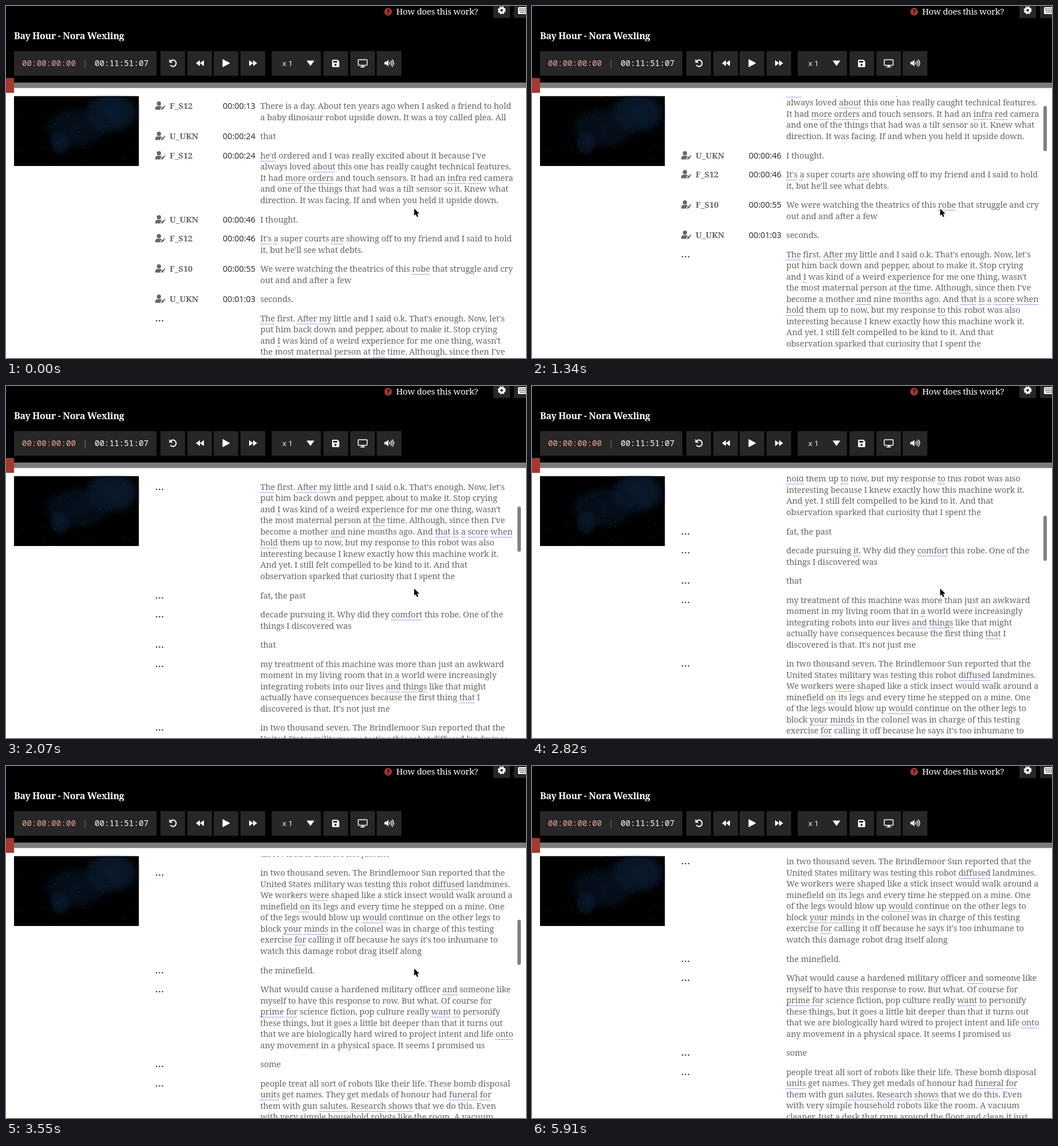
Recreate the animation shown at these times as an HTML page. Size 909 by 616 pixels, loop 6.65 s.

```html
<!DOCTYPE html>
<html lang="en">
<head>
<meta charset="utf-8">
<title>Transcript editor</title>
<style>
html, body { margin: 0; width: 100%; height: 100%; overflow: hidden; background: #fff; }
body { position: relative; font: 14.6px/19.5px "Noto Serif", serif; letter-spacing: -.3px; }
svg { position: absolute; left: 0; top: 0; }
#view { position: absolute; left: 261px; top: 158px; width: 639px; height: 458px; overflow: hidden; }
#list { padding-top: 7.3px; color: #666; letter-spacing: -.14px; will-change: transform; }
.row { position: relative; margin-bottom: 14.1px; padding-left: 183.5px; white-space: pre; }
.row b, .row i, .row em { position: absolute; top: 0; }
.row b { left: 25px; color: #666; letter-spacing: -.1px; }
.row i { left: 118px; font: 14.4px/19.5px "Open Sans", sans-serif; color: #222; letter-spacing: 0; }
.row em { left: 0; font-style: normal; font-weight: bold; color: #222; letter-spacing: 1px; }
.row svg { top: 2px; fill: #666; }
u { text-decoration: underline dotted #4a43ee 1px; text-underline-offset: 4px; text-decoration-skip-ink: none; }
#bar { position: absolute; left: 894px; width: 6px; height: 79px; border-radius: 3px; background: #808080; }
</style>
</head>
<body>
<svg id="stage" width="909" height="616" fill="#fff">
  <defs>
    <radialGradient id="glow"><stop stop-color="#0a1b30"/><stop offset=".65" stop-color="#081627" stop-opacity=".9"/><stop offset="1" stop-color="#030810" stop-opacity="0"/></radialGradient>
    <clipPath id="still"><path d="M14 157.500h218.500v122.500H14z"/></clipPath>
  </defs>
  <path d="M0 0h909v143H0z" fill="#000"/>
  <path d="M14 134h895v9.500H14z" fill="#7b7b7b"/>
  <path d="M0 126h14v26H0z" fill="#a5382f"/>
  <g fill="#272727" id="boxes"></g>

  <circle cx="668" cy="10" r="6.700" fill="#a5382f"/>
  <text x="668" y="14" font-size="11" font-weight="bold" text-anchor="middle" fill="#000" font-family="Open Sans, sans-serif">?</text>
  <text x="682" y="15" font-size="15">How does this work?</text>
  <text x="14" y="58" font-size="16" font-weight="bold">Bay Hour - Nora Wexling</text>
  <path d="M10 61.500h240v10H10z" fill="#000"/>

  <g font-family="Noto Sans Mono, monospace" font-size="14.250" letter-spacing="0">
    <text x="28" y="105" fill="#e8a498">00:00:00:00</text>
    <text x="134" y="105" fill="#777">|</text>
    <text x="155" y="105">00:11:51:07</text>
  </g>
  <text x="483" y="105" font-size="13.500" font-family="Open Sans, sans-serif" letter-spacing="0">x 1</text>

  <circle cx="866.500" cy="7.500" r="4" fill="none" stroke="#fff" stroke-width="3.600"/>
  <circle cx="866.500" cy="7.500" r="6" fill="none" stroke="#fff" stroke-width="2" stroke-dasharray="2.700 2.012"/>
  <rect x="895" y="2" width="18" height="12" rx="1.500"/>
  <path d="M897 5h12M897 8h12M898.500 11h12" stroke="#272727" stroke-width="1.500" stroke-dasharray="1.500 1"/>

  <path d="M287.800 96.200A5.600 5.600 0 1 1 287.300 103.500" fill="none" stroke="#fff" stroke-width="2"/>
  <path d="M285.500 93v6.200h6.200z"/>
  <path d="M339 94.700v10.600l-7-5.300zM346 94.700v10.600l-7-5.300z"/>
  <path d="M379 93.500v13l12-6.500z" stroke="#fff" stroke-linejoin="round"/>
  <path d="M425 94.700v10.600l7-5.300zM432 94.700v10.600l7-5.300z"/>
  <path d="M525.500 95.500h13.500l-6.750 9.500z"/>
  <path d="M570 95.500q0-1.500 1.500-1.500h8l3 3v8.500q0 1.500-1.500 1.500h-9.500q-1.500 0-1.500-1.500z"/>
  <path d="M572 96h7v3h-7z" fill="#272727"/>
  <circle cx="576" cy="103" r="1.900" fill="#272727"/>
  <rect x="615.700" y="94" width="15.600" height="9.800" rx="1" fill="none" stroke="#fff" stroke-width="1.500"/>
  <path d="M622 104h3v2h2.500v1.500h-8V106h2.500z"/>
  <path d="M661.500 97.700h3l4-3.500v11.600l-4-3.500h-3z"/>
  <path d="M670.500 97.700q2 2.300 0 4.600M672.700 95.700q4 4.300 0 8.600M674.800 93.700q6 6.300 0 12.600" fill="none" stroke="#fff" stroke-width="1.400"/>

  <g clip-path="url(#still)" id="sky">
    <path d="M14 157.500h218.500v122.500H14z" fill="#000"/>
    <g fill="url(#glow)">
      <ellipse cx="184" cy="187" rx="56" ry="42"/>
      <ellipse cx="124" cy="213" rx="68" ry="42" opacity=".6"/>
      <ellipse cx="95" cy="238" rx="22" ry="26" opacity=".8"/>
    </g>
  </g>
</svg>
<div id="view"><div id="list"></div></div>
<div id="bar"></div>
<svg id="cursor" width="16" height="20"><path d="M1.500 1.500v12.500l2.900-2.600 2.100 4.800 2.200-.9-2.100-4.700h4z" stroke="#fff" stroke-width="2" paint-order="stroke"/></svg>

<script>
const $ = id => document.getElementById(id);

// Each row: speaker | time | lines; "_" marks a doubtful word.
const script = `F_S12|00:00:13|There is a day. About ten years ago when I asked a friend to hold
a baby dinosaur robot upside down. It was a toy called plea. All

U_UKN|00:00:24|that

F_S12|00:00:24|_he'd ordered and I was really excited about it because I've
always loved _about this one has really caught technical features.
It had _more _orders and touch sensors. It had an _infra _red camera
and one of the things that had was a tilt sensor so it. Knew what
direction. It was facing. If and when you held it upside down.

U_UKN|00:00:46|I thought.

F_S12|00:00:46|_It's _a super courts _are showing off to my friend and I said to hold
it, but he'll see what debts.

F_S10|00:00:55|We were watching the theatrics of this _robe that struggle and cry
out and and after a few

U_UKN|00:01:03|seconds.

||_The first. _After _my little and I said o.k. That's enough. Now, let's
put him back down and pepper, about to make it. Stop crying
and _I was kind of a weird experience for me one thing, wasn't
the most maternal person at _the time. Although, since then I've
become a mother _and nine months ago. And _that _is _a _score _when
_hold them up _to now, but my response _to this robot was also
interesting because I knew exactly how this machine work it.
And yet. I still felt compelled to be kind to it. And that
observation sparked that curiosity that I spent the

||fat, the past

||decade pursuing _it. Why did they _comfort this robe. One of the
things I discovered was

||that

||my treatment of this machine was more than just an awkward
moment in my living room that in _a world were increasingly
integrating robots into our lives _and _things like that might
actually have consequences because the first thing _that I
discovered is that. It's not just me

||in two thousand seven. The Brindlemoor Sun reported that the
United States military was testing this robot _diffused landmines.
We workers _were shaped like a stick insect would walk around a
minefield _on its legs and every time he stepped on a mine. One
of the legs would blow up _would continue on the other legs to
block _your _minds in the colonel was in charge of this testing
exercise _for calling it off because he says it's too inhumane to
watch this damage robot drag itself along

||the minefield.

||What would cause a hardened military officer _and someone like
myself to have this response to row. But what. Of course for
_prime _for science fiction, pop culture really _want _to personify
these things, but it goes a little bit deeper than that it turns out
that we are biologically hard wired to project intent and life _onto
any movement in a physical space. It seems I promised us

||some

||people treat all sort of robots like their life. These bomb disposal
_units get names. They get medals of honour had _funeral _for
them with gun _salutes. _Research _shows that we do this. Even
with very simple household robots like the room. A vacuum
cleaner. Just a desk that runs around the floor and clean it just`;

const person = `<svg width="18" height="15"><circle cx="6.300" cy="3.800" r="3.700"/>
<path d="M0 14.500v-2.500q0-3.800 3.800-3.800h5q1.500 0 2.700 1.200l-2.300 2.400-.4 2.700zM10 14.500l.3-2.100 4-4 2 2-4 4zM14.900 7.800l1-1 2 2-1 1z"/></svg>`;

$('list').innerHTML = script.split('\n\n').map(row => {
  const [who, time, text] = row.split('|');
  const head = who ? `${person}<b>${who}</b><i>${time}</i>` : '<em>...</em>';
  // Only a "_" that starts a word is a mark.
  return `<div class="row">${head}${text.replace(/_(\S+)/g, '<u>$1</u>')}</div>`;
}).join('');

const rect = (x, y, w, h, extra = '') => `<rect x="${x}" y="${y}" width="${w}" height="${h}" ${extra}/>`;
$('boxes').innerHTML = rect(14, 79, 249, 43) + rect(464.5, 79, 86, 43) + rect(852, 0, 29, 21) + rect(888, 0, 21, 21) +
  [270, 317, 363, 410, 555, 602, 648].map(x => rect(x, 79, 43, 43)).join('');

let seed = 7;
const rand = () => (seed = seed * 16807 % 2147483647) / 2147483647;
let stars = '';
for (let i = 0; i < 70; i++)
  stars += rect(14 + rand() * 218, 158 + rand() * 122, 1, 1, `fill="#8292a5" opacity="${.15 + rand() * .45}"`);
$('sky').innerHTML += stars;

// Tracks hold [step, value] points with straight lines between them.
const scrollTrack = [[-1, 0], [0, 12], [1, 38], [3, 112], [8, 370], [9, 412], [10, 447], [11, 470], [12, 470],
  [13, 482], [14, 553], [16, 713], [17, 755], [18, 781], [19, 795], [20, 801]];
const fadeTrack = [[-1, 0], [0, 1], [21, 1], [22, .7], [23, .24], [24, 0]];
const xTrack = [[20, 712], [21, 660], [22, 430], [23, 251], [25, 256], [28, 260], [29, 256]];
const yTrack = [[20, 353], [21, 362], [22, 387], [23, 371], [25, 375], [28, 371], [29, 377]];
const hideTrack = [[32, 1], [33, .5], [34, 0]];

function at(track, k) {
  const i = track.findIndex(p => p[0] >= k);
  if (i < 0) return track.at(-1)[1];
  if (i === 0) return track[0][1];
  const [a, u] = track[i - 1], [b, v] = track[i];
  return u + (v - u) * (k - a) / (b - a);
}

function draw() {
  const k = Math.floor((performance.now() % 6650 - 890) / 147); // screen refreshes every 147 ms
  const scroll = at(scrollTrack, k);
  $('list').style.transform = `translateY(${-scroll}px)`;
  $('bar').style.top = 159.3 + scroll * .141 + 'px';
  $('bar').style.opacity = at(fadeTrack, k);
  $('cursor').style.transform = `translate(${at(xTrack, k)}px, ${at(yTrack, k)}px)`;
  $('cursor').style.opacity = at(hideTrack, k);
  requestAnimationFrame(draw);
}
draw();
</script>
</body>
</html>
```
